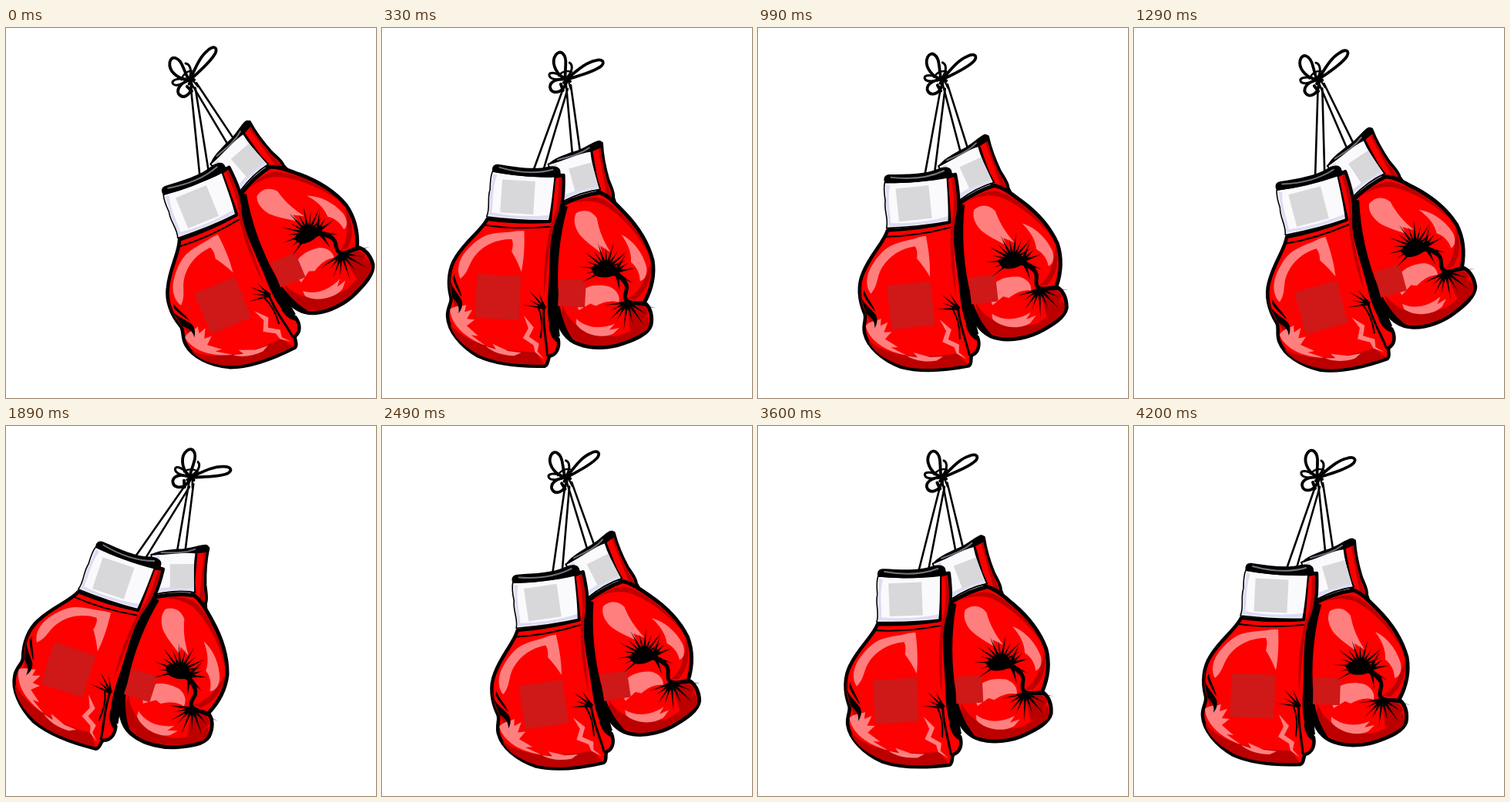
Animation, 480 px wide and 480 px high, one loop 4530 ms. Source, as an HTML page with a canvas:

```html
<!DOCTYPE html>
<html lang="en">
<head>
<meta charset="utf-8">
<title>Swinging boxing gloves</title>
<style>
html, body { margin: 0; width: 100%; height: 100%; overflow: hidden; background: #fff; }
canvas { display: block; width: 480px; height: 480px; }
</style>
</head>
<body>
<canvas id="stage" width="480" height="480"></canvas>
<script>
const ctx = document.getElementById('stage').getContext('2d');
const LOOP = 4530, SWING = 600, STEP = 30;
const PIVOT = { x: 240, y: 68 };
const ANGLES = [-25, 19.5, -19.5, 17.3, -12.3, 10, -5, 0];
const RED = '#fe0000', DARK = '#bc0000', PINK = '#ff7f7f', INK = '#000';
const CUFF = '#fafafd', SHADE = '#dcdcf2', MARK = '#d8d8da', RED_MARK = '#cf1818';

function fill(color, d) {
  ctx.fillStyle = color;
  ctx.fill(new Path2D(d));
}

function line(width, d, color = INK) {
  ctx.strokeStyle = color;
  ctx.lineWidth = width;
  ctx.stroke(new Path2D(d));
}

function shape(color, width, d) {
  fill(color, d);
  line(width, d);
}

function square(color, x, y, size, tilt) {
  ctx.save();
  ctx.translate(x, y);
  ctx.rotate(tilt);
  ctx.fillStyle = color;
  ctx.fillRect(-size / 2, -size / 2, size, size);
  ctx.restore();
}

// fan of tapered folds, angles in degrees
function folds(x, y, from, to, count, reach, width) {
  ctx.fillStyle = INK;
  for (let i = 0; i < count; i++) {
    ctx.save();
    ctx.translate(x, y);
    ctx.rotate((from + (to - from) * i / (count - 1)) * Math.PI / 180);
    const len = reach * (i % 2 ? 0.78 : 1);
    ctx.beginPath();
    ctx.moveTo(0, -width);
    ctx.quadraticCurveTo(len * 0.4, -width * 0.3, len, 0);
    ctx.quadraticCurveTo(len * 0.4, width * 0.3, 0, width);
    ctx.fill();
    ctx.restore();
  }
}

function rightGlove() {
  line(2.6, 'M239 74 L248 162 M245 74 L258 159');

  // wrist strip and body
  shape(RED, 4, 'M272 157 L286 149 C287 166 291 183 295 196 C298 204 303 212 302 219 L305 228 L284 222 Z');
  fill(DARK, 'M282 157 L285 154 C287 176 294 200 301 222 L293 216 Z');
  shape(RED, 5, 'M236 229 C252 221 270 215 285 213 C296 217 304 226 316 238 ' +
    'C334 256 348 278 354 300 C357 318 353 338 344 355 C352 361 355 372 353 384 ' +
    'C349 396 332 403 318 408 C300 415 276 416 260 410 C244 405 234 391 232 374 ' +
    'C224 340 222 270 236 229 Z');

  // shadows
  fill(DARK, 'M246 228 C262 220 280 217 290 222 C312 234 338 262 350 294 C334 264 310 240 288 228 C272 222 258 224 246 228 Z');
  fill(DARK, 'M238 360 C248 386 272 400 308 399 C324 395 340 386 348 372 C352 380 351 387 347 391 C332 401 305 412 284 411 C258 411 240 398 236 378 Z');
  fill(DARK, 'M352 300 C354 322 346 342 332 351 L322 350 C338 342 346 324 352 300 Z');
  fill(DARK, 'M322 356 C334 354 346 358 349 368 L340 384 L326 392 Z');
  fill(INK, 'M236 229 L243 232 C233 268 229 312 233 350 C235 372 242 390 252 404 C238 400 232 390 230 374 C222 340 220 268 236 229 Z');

  // highlights
  fill(PINK, 'M254 240 C264 234 274 236 281 246 C284 262 289 274 299 290 L286 282 L288 292 C278 284 268 278 259 268 C252 258 250 248 254 240 Z');
  fill(PINK, 'M313 267 C328 274 341 290 346 308 C348 318 344 326 338 327 C338 317 333 308 326 303 C327 290 321 278 313 267 Z');
  fill(PINK, 'M260 343 C268 334 283 331 299 335 C308 339 313 347 311 355 C302 352 292 354 281 360 L274 357 L259 366 C256 358 256 350 260 343 Z');
  fill(PINK, 'M256 377 C268 388 286 391 306 383 L299 391 L312 388 L304 396 C288 404 264 396 256 384 Z');

  square(RED_MARK, 250, 344, 35, 0.04);

  // folds around the thumb
  fill(INK, 'M274 311 C282 303 302 304 312 313 C309 322 288 326 279 320 Z');
  folds(294, 312, 150, 336, 12, 36, 3);
  folds(306, 315, 300, 350, 3, 26, 3);
  line(5, 'M302 318 C312 319 320 326 321 336 C320 344 316 350 323 354 C330 357 337 355 344 356');
  folds(308, 318, 30, 80, 3, 24, 3);
  folds(322, 354, 12, 118, 6, 38, 2.6);
  folds(322, 355, 135, 172, 3, 32, 2.6);

  // cuff
  shape(CUFF, 2, 'M217 177 L272 156 C274 174 279 193 285 209 C269 211 252 217 237 225 C229 208 223 194 217 177 Z');
  fill(SHADE, 'M219 179 L228 176 C231 194 238 210 242 220 L237 223 Z');
  fill(SHADE, 'M238 222 C254 214 268 210 283 208 L281 203 C266 206 251 211 238 217 Z');
  square(MARK, 263, 193, 31, -0.28);
  fill(INK, 'M216 178 C224 169 235 166 247 161 C260 158 270 150 280 146 C285 144 288 147 287 154 L273 160 C256 162 239 172 216 178 Z');
  line(2, 'M229 171 C244 167 258 164 270 155', '#70707c');
}

function leftGlove() {
  line(2.6, 'M235 79 L198 185 M241 79 L211 184');

  shape(RED, 4.5, 'M139 249 C132 264 112 277 99 299 C90 313 88 332 93 351 C95 358 88 365 89 376 ' +
    'C90 394 106 414 129 427 C154 438 190 440 216 439 C221 437 219 431 222 426 ' +
    'C231 424 235 415 233 404 C225 396 220 378 221 350 C224 310 220 280 229 252 ' +
    'C236 236 238 215 237 191 L225 193 L220 251 C191 253 164 252 139 249 Z');

  // shadows
  fill(DARK, 'M231 196 L235 194 C236 220 233 238 226 253 C219 278 218 313 214 346 C212 315 215 280 222 254 C229 238 231 220 231 196 Z');
  fill(DARK, 'M92 386 C112 409 150 421 204 421 L215 437 C180 438 146 435 126 423 C108 413 95 400 92 386 Z');
  fill(DARK, 'M96 305 C89 321 91 337 97 350 C103 357 108 360 110 368 C103 365 96 362 93 372 L98 361 C88 336 90 318 96 305 Z');
  fill(INK, 'M230 254 C221 281 225 315 220 350 C218 378 222 393 230 402 L235 400 C230 350 225 295 238 232 Z');

  // highlights
  fill(PINK, 'M134 272 C148 265 166 267 178 264 L187 264 C188 284 187 302 184 317 C180 307 176 299 171 291 ' +
    'C173 284 173 279 171 275 C151 275 136 283 126 294 C115 306 117 317 105 327 C100 318 101 304 112 291 C118 284 125 277 134 272 Z');
  fill(PINK, 'M92 367 C99 361 106 364 113 361 L111 370 L121 367 L114 379 L124 380 L114 388 L129 401 L120 400 L138 413 C112 404 93 386 92 367 Z');
  fill(PINK, 'M139 414 L152 418 L148 411 L168 420 L185 422 L176 426 C162 426 148 422 139 414 Z');
  fill(PINK, 'M188 374 L201 389 L195 401 L208 410 L206 420 L215 430 L203 421 L201 412 L187 403 L194 390 Z');

  square(RED_MARK, 154, 350, 57, 0.04);

  // creases
  fill(INK, 'M91 328 C95 340 102 346 107 355 C109 362 107 367 103 372 C105 363 101 357 95 352 Z');
  fill(INK, 'M97 321 C99 333 105 339 107 351 C102 343 97 334 95 326 Z');
  folds(215, 364, 188, 248, 4, 30, 2.2);
  line(3, 'M214 362 C212 384 218 407 219 425 M222 387 C223 397 226 402 231 406');
  line(2, 'M207 364 C212 376 212 390 210 402');
  line(2, 'M136 257 C164 261 191 261 220 258');

  // cuff
  shape(CUFF, 1.6, 'M145 187 C170 192 198 194 226 192 C224 212 223 231 219 250 C191 251 164 249 138 246 C143 235 138 222 142 211 C142 202 142 194 145 187 Z');
  fill(SHADE, 'M146 190 L151 192 C144 210 147 229 144 244 L140 244 C144 230 140 218 144 206 Z');
  fill(SHADE, 'M141 244 C166 248 194 249 218 248 L219 243 C195 246 167 245 142 240 Z');
  square(MARK, 178, 220, 43, 0.05);
  fill(INK, 'M145 188 C143 181 147 177 153 178 C175 181 199 185 217 180 C227 178 234 181 233 188 L237 192 L227 194 C199 195 169 192 145 188 Z');
  line(2, 'M154 182 C176 188 202 190 223 184', '#74747e');
}

function bow() {
  line(3.8, 'M235 65 C224 57 219 44 225 35 C231 27 239 34 238 48 C238 55 237 61 238 66');
  line(3.8, 'M241 65 C252 56 263 45 276 42 C285 39 290 43 284 49 C274 57 257 61 242 66');
  line(3, 'M238 66 C228 68 218 67 217 62 C216 56 228 58 238 66 C247 58 248 48 243 45');
  line(3.8, 'M239 67 C229 65 218 69 218 77 C220 87 232 84 236 77 C239 73 240 70 239 67');
  line(4, 'M234 65 L244 69 M236 71 L243 66 M232 73 L235 81');
  line(2.4, 'M229 62 C234 56 240 55 246 57 M242 69 L245 79');
}

function angleAt(t) {
  const i = Math.floor(t / SWING);
  if (i >= ANGLES.length - 1) return 0;
  const k = (1 - Math.cos(Math.PI * (t / SWING - i))) / 2;
  return ANGLES[i] + (ANGLES[i + 1] - ANGLES[i]) * k;
}

function draw(now) {
  const t = Math.floor((now % LOOP) / STEP) * STEP;
  ctx.fillStyle = '#fff';
  ctx.fillRect(0, 0, 480, 480);
  ctx.save();
  ctx.lineCap = ctx.lineJoin = 'round';
  ctx.translate(PIVOT.x, PIVOT.y);
  ctx.rotate(angleAt(t) * Math.PI / 180);
  ctx.translate(-PIVOT.x, -PIVOT.y);
  rightGlove();
  leftGlove();
  bow();
  ctx.restore();
}

const start = performance.now();
function tick() {
  draw(performance.now() - start);
  requestAnimationFrame(tick);
}
tick();
</script>
</body>
</html>
```
